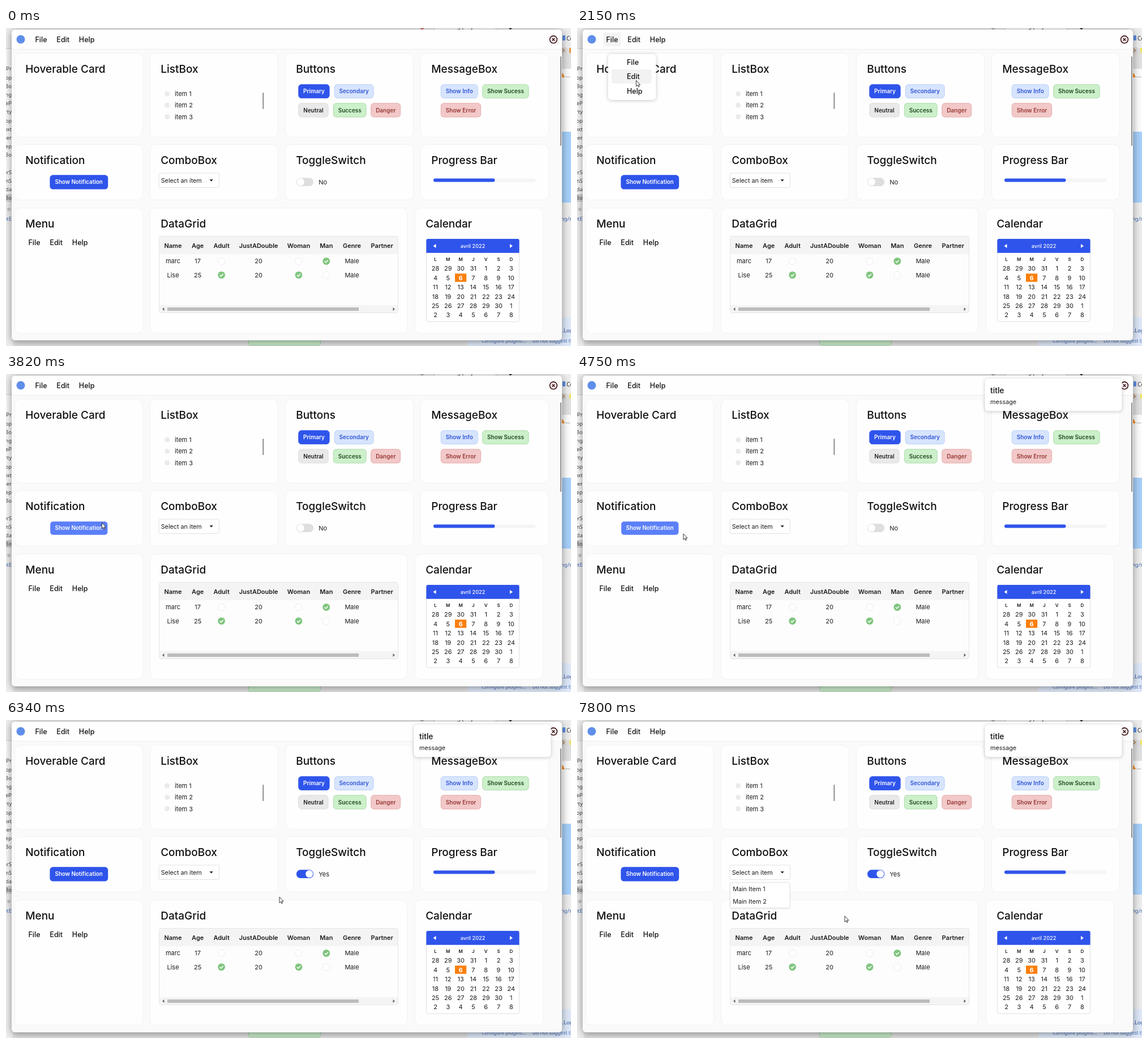
Recreate the animation shown at these times as an HTML page. Size 998 by 561 pixels, loop 8000 ms.

```html
<!DOCTYPE html>
<html lang="en">
<head>
<meta charset="utf-8">
<title>Control gallery</title>
<style>
html, body { margin: 0; width: 100%; height: 100%; overflow: hidden; background: #e6e6e6; }
svg { display: block; width: 998px; height: 561px; font-family: Inter, sans-serif; font-optical-sizing: none; }
text { white-space: pre; }
.ide { font-family: 'Noto Sans', sans-serif; }
.win { filter: drop-shadow(0 2px 7px rgba(0,0,0,.42)); }
.pop { filter: drop-shadow(0 1px 3px rgba(0,0,0,.22)); }
.low { filter: drop-shadow(0 1px 1px rgba(0,0,0,.1)); }
</style>
</head>
<body>
<svg id="stage" viewBox="0 0 998 561" xmlns="http://www.w3.org/2000/svg"></svg>
<script>
const BLUE = '#2f54eb', INK = '#1c1c1c';

const rect = (x, y, x2, y2, fill, r = 0, extra = '') =>
  `<rect x="${x}" y="${y}" width="${x2 - x}" height="${y2 - y}" rx="${r}" fill="${fill}" ${extra}/>`;
const framed = (x, y, x2, y2, fill, line, r) =>
  rect(x + .5, y + .5, x2 - .5, y2 - .5, fill, r, `stroke="${line}"`);
const circle = (x, y, r, fill, extra = '') =>
  `<circle cx="${x}" cy="${y}" r="${r}" fill="${fill}" ${extra}/>`;
const path = (d, fill, extra = '') => `<path d="${d}" fill="${fill}" ${extra}/>`;
const group = (id, body, extra = '') => `<g id="${id}" ${extra}>${body}</g>`;

// y is the middle of the capitals
const label = (s, x, y, size = 11, weight = 400, fill = INK, anchor = 'start', extra = '') =>
  `<text x="${x}" y="${(y + size * .364).toFixed(2)}" font-size="${size}" font-weight="${weight}" fill="${fill}" text-anchor="${anchor}" ${extra}>${s}</text>`;
const mid = (s, x, y, size, weight, fill) => label(s, x, y, size, weight, fill, 'middle');
const ide = (s, x, y, size, fill, anchor) => label(s, x, y, size, 400, fill, anchor, 'class="ide"');

const card = (x, y, x2, y2, title) =>
  framed(x, y, x2, y2, '#fefefe', '#f2f2f2', 10) + label(title, x + 19.2, y + 28.1, 19, 550, '#111');

const tones = {
  primary: [BLUE, BLUE, '#fff'],
  info: ['#d7e4fd', '#b8cff8', '#3156d6'],
  neutral: ['#e9e9e9', '#dcdcdc', '#222'],
  success: ['#ccf0ca', '#addbac', '#20491f'],
  danger: ['#f2c8c8', '#e4adac', '#963a36'],
};
const button = (s, x, y, x2, y2, tone) => {
  const [fill, line, ink] = tones[tone];
  return framed(x + .3, y + .3, x2 - .4, y2 - .4, fill, line, 5) + mid(s, (x + x2) / 2, (y + y2) / 2, 10, 600, ink);
};

const menuBar = (x, y) => ['File', 'Edit', 'Help']
  .map((s, i) => mid(s, x + [0, 38.7, 80.6][i], y, 12.5, 500, '#111')).join('');

function desktop() {
  const code = 'Pr top oBo ing leP erty top ext per ep tBo - erS nS da kBo'.split(' ');
  const side = code.map((s, i) => s === '-' ? '' : ide(s, 10, 72 + i * 15.2, 9.5, '#444', 'end')).join('');
  return rect(0, 0, 998, 561, '#e0e0e0') +
    rect(0, 0, 998, 36, '#ededed') + rect(0, 36, 12, 308, '#f8f8f8') +
    rect(0, 36, 12, 37, '#d0d0d0') + rect(0, 293, 12, 307, '#d2d2d2') + side +
    rect(0, 308, 12, 329, '#ececec') + circle(5, 320, 3, '#c4c4c4') + rect(0, 329, 12, 561, '#eeeeee') +
    ide('etE', 10, 337, 9.5, '#3f68b5', 'end') +
    rect(756, 0, 865, 4, '#fafafa') + rect(756, 0, 757, 4, '#ccc') + rect(865, 0, 866, 4, '#ccc') +
    ide('Loading project', 765, -3.5, 10, '#555') +
    path('M888 0H894L891 3Z', '#333') +
    group('tick', path('M732 0L735 2L738 0', 'none', 'stroke="currentColor" stroke-width="1.3"')) +
    rect(980, 72, 998, 183, '#fcfcfc') + rect(980, 183, 998, 308, '#a6cff9') +
    rect(980, 308, 998, 510, '#ececec') +
    rect(983, 13, 988, 22, '#5c8fe0', 1) + ide('Co', 990, 18, 10, '#333') +
    rect(976, 34, 990, 46, '#d9d9d9', 2) + path('M983 36.500L986.500 39.500L983 42.500', 'none', 'stroke="#b07440" stroke-width="1.2"') +
    group('spark', rect(995, 35, 998, 44, 'currentColor')) +
    path('M983 79L987 87H979Z', '#f28a1d') + label('...', 988, 83, 10, 400, '#444') +
    ide('ng/n', 980, 337, 9.5, '#3f68b5') +
    rect(815, 510, 998, 561, '#dde7f7') + ide('s.Log', 978, 533.5, 9.5, '#2d4f94') +
    framed(428, 520, 556, 560, '#c9ecca', '#9fcfa2', 3) +
    group('built', ide('Build succeeded at', 437, 548, 9, '#4f7a52')) +
    ide('Configure plugins...', 840, 551.5, 8.6, '#4a72b8') +
    ide('Do not suggest this', 930, 551.5, 8.6, '#4a72b8');
}

function dataGrid() {
  const heads = ['Name', 'Age', 'Adult', 'JustADouble', 'Woman', 'Man', 'Genre', 'Partner'];
  const cols = [295, 338.7, 380.6, 446.2, 517, 565.8, 611, 664.3];
  const check = (on, x, y) => on
    ? circle(x, y, 6.4, '#80c57f') + path(`M${x - 3} ${y}l2.200 2.300 3.900-4.300`, 'none', 'stroke="#fff" stroke-width="1.5"')
    : circle(x, y, 6.3, '#fff', 'stroke="#ececec"');
  const rows = [['marc', 17, false, 20, false, true, 'Male'], ['Lise', 25, true, 20, true, false, 'Male']];
  const cells = rows.map((row, r) => row.map((v, i) => {
    const y = 411.4 + r * 24.4;
    return typeof v === 'boolean' ? check(v, cols[i], y) : mid(v, cols[i], y, 11);
  }).join('')).join('');
  return framed(270, 367, 693, 503, '#fdfdfd', '#e6e6e6', 3) +
    rect(271, 368, 692, 399, '#f4f4f4', 2) + rect(271, 489, 692, 502, '#f4f4f4') +
    heads.map((s, i) => mid(s, cols[i], 383.5, 11, 600)).join('') + cells +
    rect(285, 493, 623, 499, '#bcbcbc') +
    path('M279.500 493V499L276 496ZM683.500 493V499L687 496Z', '#666');
}

function calendar() {
  let out = framed(742, 372, 907, 518.5, '#fff', '#e0e0e0', 3) +
    path('M742.400 396.700V375a3 3 0 0 1 3-3H903.600a3 3 0 0 1 3 3V396.700Z', BLUE) +
    path('M759.500 381V388L754.500 384.500ZM890 381V388L895 384.500Z', '#fff') +
    mid('avril 2022', 824.5, 384.5, 9.1, 550, '#fff') + rect(793, 433.3, 813.2, 447.8, '#fb7f0c');
  const colX = i => 758.5 + 22.3 * i;
  [...'LMMJVSD'].forEach((s, i) => out += mid(s, colX(i), 408, 8, 600));
  for (let i = 0; i < 42; i++) {
    const day = i < 4 ? 28 + i : (i - 4) % 30 + 1;
    const today = i === 9;
    out += mid(day, colX(i % 7), 424.4 + 16.4 * Math.floor(i / 7), 11, today ? 700 : 400, today ? '#fff' : INK);
  }
  return out;
}

function windowBody() {
  return `<g class="win">${rect(10, 3, 982, 551, '#fafafa', 6)}</g>` +
    path('M10 37.500V9a6 6 0 0 1 6-6H976a6 6 0 0 1 6 6V37.500Z', '#fefefe') + rect(10, 37, 982, 38, '#ececec') +
    circle(26, 20, 7.5, '#5f8eea') +
    group('fileHover', rect(46.5, 8, 77, 32, '#f3f3f3', 2)) + menuBar(62, 20) +
    circle(967, 20.3, 6.4, '#fff', 'stroke="#3d0c10" stroke-width="1.6"') +
    path('M964.700 18l4.600 4.600M969.300 18l-4.600 4.600', 'none', 'stroke="#3d0c10" stroke-width="1.5"') +
    rect(979.2, 50, 980.9, 208, '#7c7c7c', 1) +
    card(15, 44, 242, 193, 'Hoverable Card') + card(254, 44, 481, 193, 'ListBox') +
    card(493, 44, 720, 193, 'Buttons') + card(732, 44, 959, 193, 'MessageBox') +
    card(15, 205, 242, 304, 'Notification') + card(254, 205, 481, 304, 'ComboBox') +
    card(493, 205, 720, 304, 'ToggleSwitch') + card(732, 205, 959, 304, 'Progress Bar') +
    card(15, 317, 242, 539, 'Menu') + card(254, 317, 709, 539, 'DataGrid') + card(722, 317, 949, 539, 'Calendar') +
    [1, 2, 3].map(n => circle(284.7, 95.7 + 20.3 * n, 4.6, '#ebebeb') + label('item ' + n, 298, 95.6 + 20.3 * n)).join('') +
    rect(453.5, 114, 455.1, 143, '#777', 1) +
    button('Primary', 516, 99, 572, 124.5, 'primary') + button('Secondary', 579.5, 99, 650, 124.5, 'info') +
    button('Neutral', 516, 132, 570, 158, 'neutral') + button('Success', 577.5, 132, 637, 158, 'success') +
    button('Danger', 644, 132, 697.5, 158, 'danger') +
    button('Show Info', 767.5, 99, 834, 124.5, 'info') + button('Show Sucess', 841, 99, 924, 124.5, 'success') +
    button('Show Error', 767.5, 132, 839.5, 158, 'danger') +
    group('notify', rect(77.4, 259.3, 180.2, 284.6, BLUE, 5.5)) + group('notifyHover', rect(78.2, 260.2, 179.4, 283.7, '#5b7ff7', 5)) +
    mid('Show Notification', 128.6, 271.9, 9.8, 600, '#fff') +
    framed(269.5, 255.5, 377, 282, '#fff', '#e1e1e1', 3) +
    group('comboHover', rect(349, 256.5, 376, 281, '#f6f6f6', 2)) +
    label('Select an item', 273.7, 269, 10.8) + path('M359.500 267.200H365.800L362.600 270.500Z', '#111') +
    `<rect id="track" x="512.900" y="264.200" width="30.200" height="14.900" rx="7.450"/>` +
    `<circle id="knob" cy="271.600" r="6.500" fill="#fff"/>` +
    label('No', 552.2, 271.7, 11, 400, INK, 'start', 'id="state"') +
    rect(755, 265.5, 935.5, 271.5, '#f5f5f5', 3) + rect(755, 265.5, 863.5, 271.5, BLUE, 3) +
    menuBar(50, 378.8) + dataGrid() + calendar();
}

function overlays() {
  return group('menu', rect(55, 46, 139.5, 127, '#fff', 6) + '<rect id="pick" x="61" width="70.500" height="24.500" rx="3" fill="#f2f2f2"/>' +
      ['File', 'Edit', 'Help'].map((s, i) => label(s, 88, 60 + 25.6 * i, 12.5, 500, '#111')).join(''), 'class="pop"') +
    group('toast', rect(720.5, 8, 962.5, 65.3, '#fff', 6) +
      label('title', 730, 28.5, 13.8, 500, '#111') + label('message', 730, 49, 10.8), 'class="pop"') +
    group('list', framed(270, 286.3, 376.5, 332, '#fff', '#e2e2e2', 2) +
      label('Main Item 1', 275.2, 297.8, 10.8) + label('Main Item 2', 275.2, 319.7, 10.8), 'class="low"') +
    group('cursor', path('M.400.400V10.700L2.800 8.500L4.300 11.900L5.900 11.200L4.400 7.900H7.500Z', '#fff', 'stroke="#222" stroke-width=".9"'));
}

document.getElementById('stage').innerHTML = desktop() + windowBody() + overlays();
const $ = id => document.getElementById(id);
const show = (id, on) => $(id).setAttribute('display', on ? 'inline' : 'none');
const clamp = v => Math.max(0, Math.min(1, v));

// pointer route: time, x, y
const route = [
  [100, 911, 544], [300, 760, 450], [500, 430, 235], [700, 110, 72], [780, 31, 42], [900, 42, 32],
  [970, 46, 30], [1100, 54, 21.5], [1750, 54, 21.5], [1950, 72, 52], [2150, 104, 92], [2490, 170, 159],
  [2620, 170, 159], [2850, 140, 122], [3150, 122, 132], [3420, 130, 142], [3480, 131, 146],
  [3820, 169, 262], [4160, 172, 271], [4500, 172, 271], [4750, 187, 281.5], [5080, 349, 282],
  [5500, 525, 269], [5940, 532, 275], [6010, 532, 277], [6340, 483, 312], [6600, 390, 282],
  [6800, 357, 266], [7200, 357, 266], [7670, 453, 348], [7800, 472.5, 345.5], [8000, 472.5, 345.5],
];

function pointer(t) {
  const i = Math.max(1, route.findIndex(p => p[0] > t));
  const [a, b] = [route[i - 1], route[i]];
  const k = clamp((t - a[0]) / (b[0] - a[0]));
  return [a[1] + (b[1] - a[1]) * k, a[2] + (b[2] - a[2]) * k];
}

function draw(t) {
  const [x, y] = pointer(t);
  show('cursor', t >= 100);
  $('cursor').setAttribute('transform', `translate(${x} ${y})`);

  const blurred = t >= 1290;
  $('tick').setAttribute('color', blurred ? '#999' : '#d33a3a');
  $('spark').setAttribute('color', blurred ? '#f3e36a' : '#ee9a45');
  $('built').setAttribute('opacity', blurred ? .5 : 1);

  show('fileHover', t >= 1000 && t < 2690);
  show('menu', t >= 1290 && t < 2690);
  const item = Math.floor((y - 47.5) / 25.6);
  show('pick', item >= 0 && item < 3 && x > 55 && x < 139 && t < 2690);
  $('pick').setAttribute('y', 47.7 + 25.6 * item);

  const hot = t >= 3740 && t < 4800;
  show('notify', !hot);
  show('notifyHover', hot);
  show('toast', t >= 4290);
  $('toast').setAttribute('opacity', clamp((t - 4220) / 350) ** 2);

  show('comboHover', x > 270 && x < 377 && y > 256 && y < 282 && t < 6940);
  show('list', t >= 6940);

  const on = clamp((t - 5600) / 140);
  $('track').setAttribute('fill', on > 0 ? BLUE : '#dedede');
  $('knob').setAttribute('cx', 520.3 + 15.4 * on);
  $('state').textContent = on > 0 ? 'Yes' : 'No';
}

const start = performance.now();
function tick() {
  draw((performance.now() - start) % 8000);
  requestAnimationFrame(tick);
}
tick();
</script>
</body>
</html>
```
